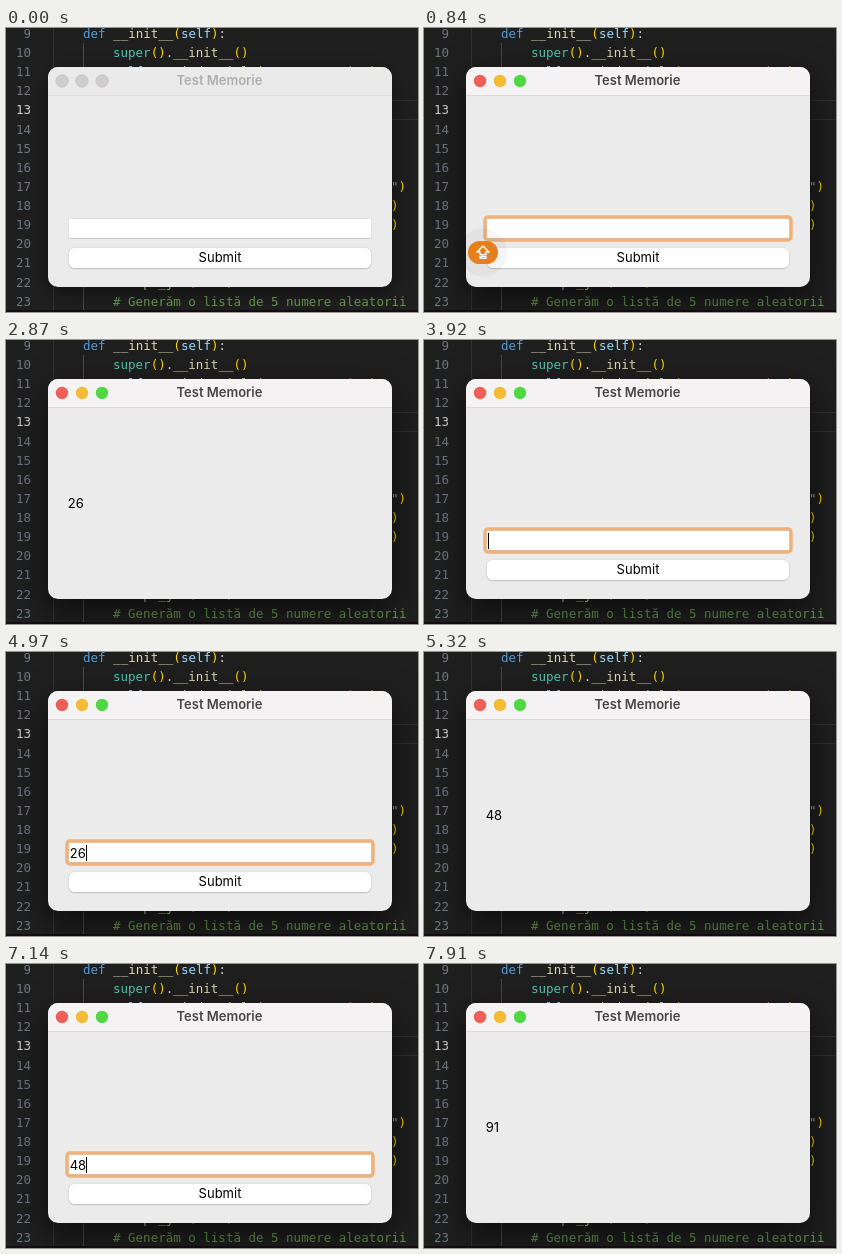
An HTML page with a canvas that plays this animation: 412x284 px, repeating every 8000 ms.

```html
<!DOCTYPE html>
<html lang="ro">
<head>
<meta charset="utf-8">
<title>Test Memorie</title>
<style>
  html, body { margin: 0; width: 100%; height: 100%; overflow: hidden; background: #1f1f1f; }
  canvas { display: block; width: 412px; height: 284px; }
</style>
</head>
<body>
<canvas id="stage"></canvas>
<script>
const W = 412, H = 284, LOOP = 8000, STEP = 70, BLINK = 560;
const CODE_FONT = '12.5px "DejaVu Sans Mono", monospace';
const UI_FONT = '13px Inter, sans-serif';
const TITLE_FONT = '600 13px Inter, sans-serif';
const CHAR = 7.53, LINE = 19.12;

const canvas = document.getElementById('stage');
const ctx = canvas.getContext('2d');
const dpr = window.devicePixelRatio || 1;
canvas.width = W * dpr;
canvas.height = H * dpr;
ctx.scale(dpr, dpr);

const KEY = '#569cd6', FN = '#dcdcaa', VAR = '#9cdcfe', CLS = '#4ec9b0',
      PAREN = '#ffd700', STR = '#ce9178', PLAIN = '#cccccc', NOTE = '#6a9955';

// line number, x, then [text, colour] tokens
const code = [
  [9, 77, ['def ', KEY], ['__init__', FN], ['(', PAREN], ['self', VAR], [')', PAREN], [':', PLAIN]],
  [10, 107, ['super', CLS], ['()', PAREN], ['.', PLAIN], ['__init__', FN], ['()', PAREN]],
  [11, 107, ['self', VAR], ['.', PLAIN], ['setWindowTitle', FN], ['(', PAREN], ['"Test Memorie"', STR], [')', PAREN]],
  [17, 385, ['"', STR], [')', PAREN]],
  [18, 385, [')', PAREN]],
  [19, 385, [')', PAREN]],
  [22, 77, ['def ', KEY], ['incepe_joc', FN], ['(', PAREN], ['self', VAR], [')', PAREN], [':', PLAIN]],
  [23, 107, ['# Generăm o listă de 5 numere aleatorii', NOTE]]
];

// caret: time from which the caret blinks
const scenes = [
  { at: 0, text: '', caret: 280 },
  { at: 1820, text: '9', caret: 1820 },
  { at: 1890, text: '97', caret: 1890 },
  { at: 2800, text: '97', caret: 1890, pressed: true },
  { at: 2870, label: '26' },
  { at: 3920, text: '', caret: 3920 },
  { at: 4830, text: '2', caret: 4830 },
  { at: 4970, text: '26', caret: 4970 },
  { at: 5180, text: '26', caret: 4970, pressed: true },
  { at: 5320, label: '48' },
  { at: 6370, text: '', caret: 6300 },
  { at: 7070, text: '4', caret: 7070 },
  { at: 7140, text: '48', caret: 7140 },
  { at: 7840, text: '48', caret: 7140, pressed: true },
  { at: 7910, label: '91' }
];

const clamp = v => Math.max(0, Math.min(1, v));

function rect(x, y, w, h, color) {
  ctx.fillStyle = color;
  ctx.fillRect(x, y, w, h);
}

function roundPath(x, y, w, h, r) {
  ctx.beginPath();
  ctx.roundRect(x, y, w, h, r);
}

function text(str, x, y, font, color, align = 'left') {
  ctx.font = font;
  ctx.fillStyle = color;
  ctx.textAlign = align;
  ctx.fillText(str, x, y);
}

function shadow(blur, dy, alpha) {
  ctx.shadowColor = `rgba(0,0,0,${alpha})`;
  ctx.shadowBlur = blur * dpr;
  ctx.shadowOffsetY = dy * dpr;
}

function drawEditor() {
  rect(0, 0, W, H, '#1f1f1f');
  rect(47, 0, 1, H, '#333333');
  rect(77, 15, 1, H, '#4b4b4b');
  rect(47, 72, W, 1, '#303030');
  rect(47, 91, W, 1, '#303030');
  const baseline = n => 10 + (n - 9) * LINE;
  for (let n = 9; n <= 23; n++)
    text(n, 25, baseline(n), CODE_FONT, n === 13 ? '#d0d0d0' : '#6e7681', 'right');
  for (const [n, start, ...tokens] of code) {
    let x = start;
    for (const [str, color] of tokens) {
      text(str, x, baseline(n), CODE_FONT, color);
      x += str.length * CHAR;
    }
  }
  rect(0, 282, W, 2, '#150d11');
}

function drawWindow(active) {
  ctx.save();
  if (active) shadow(34, 12, 0.6); else shadow(18, 6, 0.45);
  roundPath(42, 39, 344, 220, 10);
  ctx.fillStyle = '#ebebeb';
  ctx.fill();
  ctx.restore();

  roundPath(42, 39, 344, 28, [10, 10, 0, 0]);
  ctx.fillStyle = active ? '#f4f2f3' : '#ebeaea';
  ctx.fill();
  rect(42, 67, 344, 1, active ? '#d9d8d8' : '#dedddd');

  const lights = active ? ['#ee5f58', '#f3bc37', '#53d645'] : Array(3).fill('#cfcdce');
  lights.forEach((color, i) => {
    ctx.beginPath();
    ctx.arc(56 + i * 20, 53, 6.2, 0, 7);
    ctx.fillStyle = color;
    ctx.fill();
    if (!active) {
      ctx.strokeStyle = '#bfbdbe';
      ctx.lineWidth = 0.7;
      ctx.stroke();
    }
  });
  text('Test Memorie', 213.5, 57.4, TITLE_FONT, active ? '#464546' : '#afaeaf', 'center');
}

function drawForm(scene, time) {
  rect(62.5, 190.5, 303, 20, '#d3d3d3');
  rect(63, 191, 302, 19, '#ffffff');
  rect(63, 210, 302, 0.7, '#bcbcbc');

  const active = time >= 280;
  if (active) {
    const focus = clamp((time - 210) / 350), out = 1.5 + (1 - focus) * 12;
    roundPath(62.5 - out, 190.5 - out, 303 + 2 * out, 20 + 2 * out, 3);
    ctx.strokeStyle = `rgba(238,178,125,${focus})`;
    ctx.lineWidth = 3.5;
    ctx.stroke();
  }

  ctx.save();
  shadow(1.5, 0.6, 0.35);
  roundPath(63, 220, 302, 20, 5.5);
  ctx.fillStyle = scene.pressed ? '#f0f0f0' : '#ffffff';
  ctx.fill();
  ctx.restore();
  text('Submit', 214, 234.3, UI_FONT, '#000', 'center');

  text(scene.text, 63.7, 205.7, UI_FONT, '#000');
  const caretOn = active && Math.floor((time - scene.caret) / BLINK) % 2 === 0;
  if (caretOn) rect(Math.round(64 + ctx.measureText(scene.text).width), 193, 1, 16, '#000');
}

function drawBadge(cx, alpha) {
  const cy = 224.5;
  ctx.save();
  ctx.globalAlpha = alpha;
  ctx.beginPath();
  ctx.arc(cx, cy, 24, 0, 7);
  ctx.fillStyle = 'rgba(0,0,0,0.04)';
  ctx.fill();
  roundPath(cx - 15, cy - 11.5, 30, 23, 11.5);
  ctx.fillStyle = '#e5801d';
  ctx.fill();

  ctx.translate(cx, cy);
  ctx.strokeStyle = '#fff';
  ctx.lineWidth = 1.4;
  ctx.lineJoin = 'round';
  ctx.beginPath();
  ctx.moveTo(0, -6.5);
  for (const [x, y] of [[6, -0.5], [3, -0.5], [3, 2.2], [-3, 2.2], [-3, -0.5], [-6, -0.5]]) ctx.lineTo(x, y);
  ctx.closePath();
  ctx.stroke();
  ctx.strokeRect(-3, 4.1, 6, 1.8);
  ctx.restore();
}

function badgeAlpha(time) {
  if (time < 1820) return clamp((time - 280) / 280);
  if (time < 1890) return 0.5;
  if (time < 2450 || time >= 2870) return 0;
  return time < 2520 || time >= 2800 ? 0.5 : 1;
}

function draw(now) {
  const time = Math.floor((now % LOOP) / STEP) * STEP;
  const scene = scenes.findLast(s => s.at <= time);
  drawEditor();
  drawWindow(time >= 280);
  if (scene.label) text(scene.label, 61.7, 168, UI_FONT, '#000');
  else drawForm(scene, time);
  const alpha = badgeAlpha(time);
  if (alpha) drawBadge(time < 1890 ? 59 : 74, alpha);
}

const start = performance.now();
function tick() {
  draw(performance.now() - start);
  requestAnimationFrame(tick);
}
tick();
</script>
</body>
</html>
```
